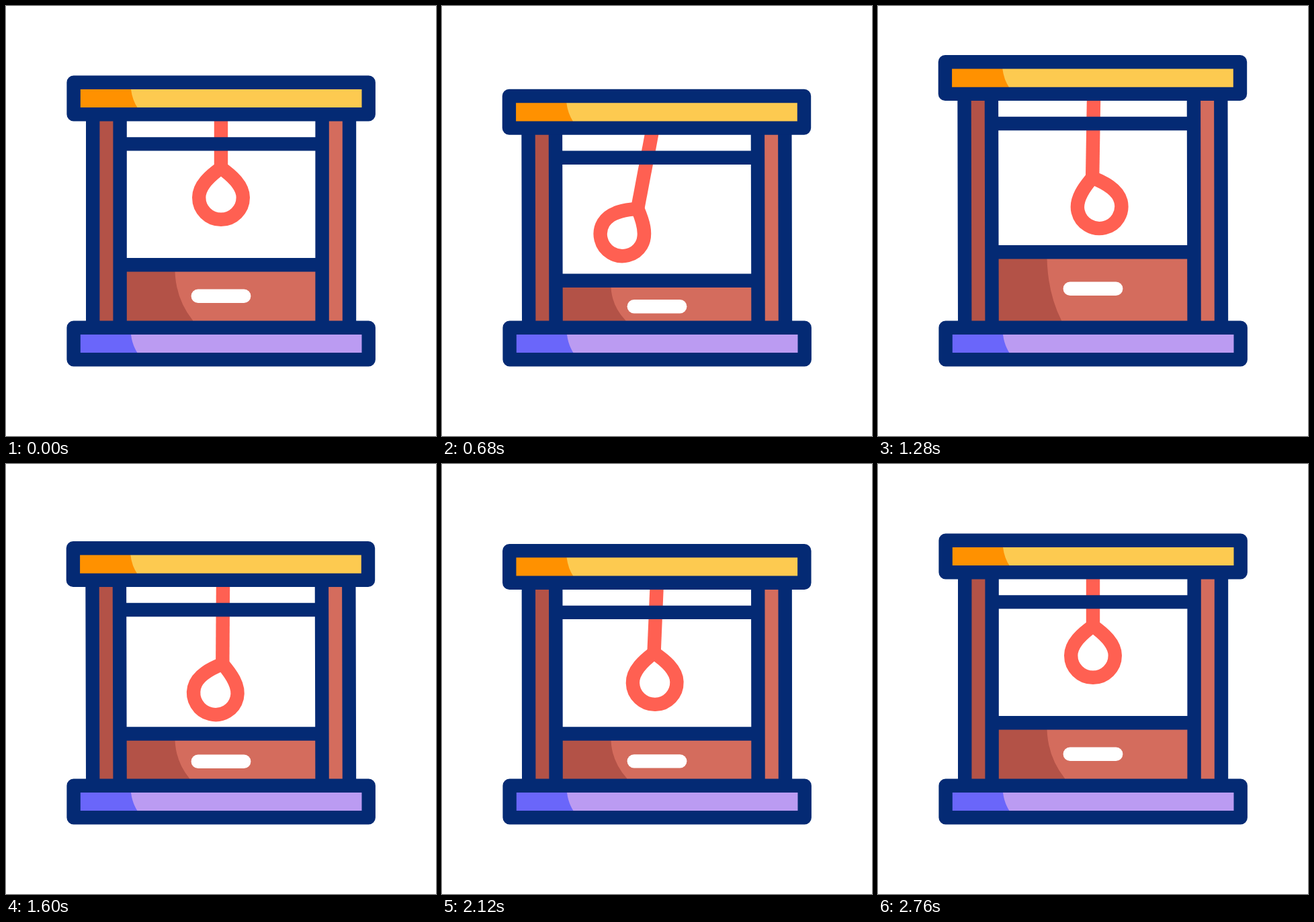
Animation of 640x640 px, one loop 3 s. Source, as an HTML page:

```html
<!DOCTYPE html>
<html lang="en">
<head>
<meta charset="utf-8">
<style>
  html, body { margin: 0; width: 100%; height: 100%; overflow: hidden; background: #fff; }
  svg { display: block; width: 100%; height: 100%; }
  .ink { fill: none; stroke: #042a74; stroke-width: 20.4; stroke-linejoin: round; }
  .rope { fill: none; stroke: #ff6052; stroke-width: 20.4; stroke-linejoin: round; }
</style>
</head>
<body>
<svg viewBox="0 0 640 640">
  <path id="panel" fill="#d46c5d"/>
  <path id="shade" fill="#b35247"/>
  <path id="leftPost" fill="#b35247"/>
  <path id="rightPost" fill="#d46c5d"/>
  <path id="slot" fill="none" stroke="#fff" stroke-width="20.4" stroke-linecap="round"/>
  <path id="cord" class="rope"/>
  <path id="loop" class="rope" d="M0 0C14 10 32.8 25 32.8 44A32.8 32.8 0 0 1 -32.8 44C-32.8 25 -14 10 0 0Z"/>
  <path id="frame" class="ink"/>
  <g id="top">
    <path fill="#fdca50" d="M100.6 113.7H539.7V161.3H100.6Z"/>
    <path fill="#ff9100" d="M100.6 113.7H186V124Q188 140 196 152V161.3H100.6Z"/>
    <path class="ink" d="M100.6 113.7H539.7V161.3H100.6Z"/>
  </g>
  <g transform="translate(0 365)">
    <path fill="#bb9bf2" d="M100.6 113.7H539.7V161.3H100.6Z"/>
    <path fill="#6a66fa" d="M100.6 113.7H186V124Q188 140 196 152V161.3H100.6Z"/>
    <path class="ink" d="M100.6 113.7H539.7V161.3H100.6Z"/>
  </g>
</svg>
<script>
const LOOP = 3000, STEP = 40, RAD = Math.PI / 180;
const el = id => document.getElementById(id);
const setPath = (id, d) => el(id).setAttribute('d', d);

// Eased value at time t of a track of [time, value] keys
function track(t, keys) {
  if (t <= keys[0][0]) return keys[0][1];
  for (let i = 1; i < keys.length; i++) {
    const [t0, a] = keys[i - 1], [t1, b] = keys[i];
    if (t < t1) {
      const s = (t - t0) / (t1 - t0);
      return a + (b - a) * s * s * (3 - 2 * s);
    }
  }
  return keys[keys.length - 1][1];
}

// The structure sinks, leaps up, sinks again and settles
const bounce = (t, down, up) =>
  track(t, [[220, 0], [535, down], [1115, up], [1225, up], [1812, down], [2440, 0]]);

const ropeAngle = [[220, 0], [640, 11.2], [1080, -10], [1430, 8], [1750, -6], [2090, 2.5], [2400, -1], [2700, 0]];
const loopAngle = [[220, 0], [680, 31], [1180, -22], [1520, 18], [1860, -13], [2260, 3], [2640, 0]];
const ropeShift = [[220, 0], [680, -8], [960, 0], [1280, 1], [1600, 3], [2120, -0.5], [2500, 0]];
const stretch = [[220, 0], [760, 1], [1840, 1], [2440, 0]];

function draw(t) {
  const y = bounce(t, 30, -32);
  const dx = bounce(t, -0.7, -0.7);
  const beamY = 385.3 + bounce(t, 31.6, -20.3);
  const slotY = 431.8 + bounce(t, 20.5, -11.8);
  const pull = track(t, stretch);
  const postTop = 161 + y;

  el('top').setAttribute('transform', `translate(${dx} ${y})`);
  setPath('panel', `M170 ${beamY}H470V478H170Z`);
  const edgeY = beamY + 10;
  setPath('shade', `M170 ${beamY}H251.5V${edgeY}Q253 ${edgeY + (468 - edgeY) * 0.57} ${278 - 5 * pull} 468V478H170Z`);
  setPath('slot', `M285.8 ${slotY}H354.2`);

  const post = (l, r) => `M${l + dx} ${postTop}H${r + dx}L${r} 478H${l}Z`;
  setPath('leftPost', post(129.2, 169.6));
  setPath('rightPost', post(470.6, 511));
  setPath('frame', [129.2, 169.6, 470.6, 511].map(x => `M${x + dx} ${postTop}L${x} 478`).join('') +
    `M170 ${205.4 + y}H470M170 ${beamY}H470`);

  const angle = track(t, ropeAngle) * RAD;
  const length = 70 + 45 * pull;
  const x0 = 320 + track(t, ropeShift), y0 = 171 + y;
  const sin = Math.sin(angle), cos = Math.cos(angle);
  const x1 = x0 - sin * length, y1 = y0 + cos * length;
  setPath('cord', `M${x0 + sin * 12} ${y0 - cos * 12}L${x1} ${y1}`);
  el('loop').setAttribute('transform', `translate(${x1} ${y1}) rotate(${track(t, loopAngle)})`);
}

function tick() {
  draw(Math.floor(performance.now() % LOOP / STEP) * STEP);
  requestAnimationFrame(tick);
}
tick();
</script>
</body>
</html>
```
